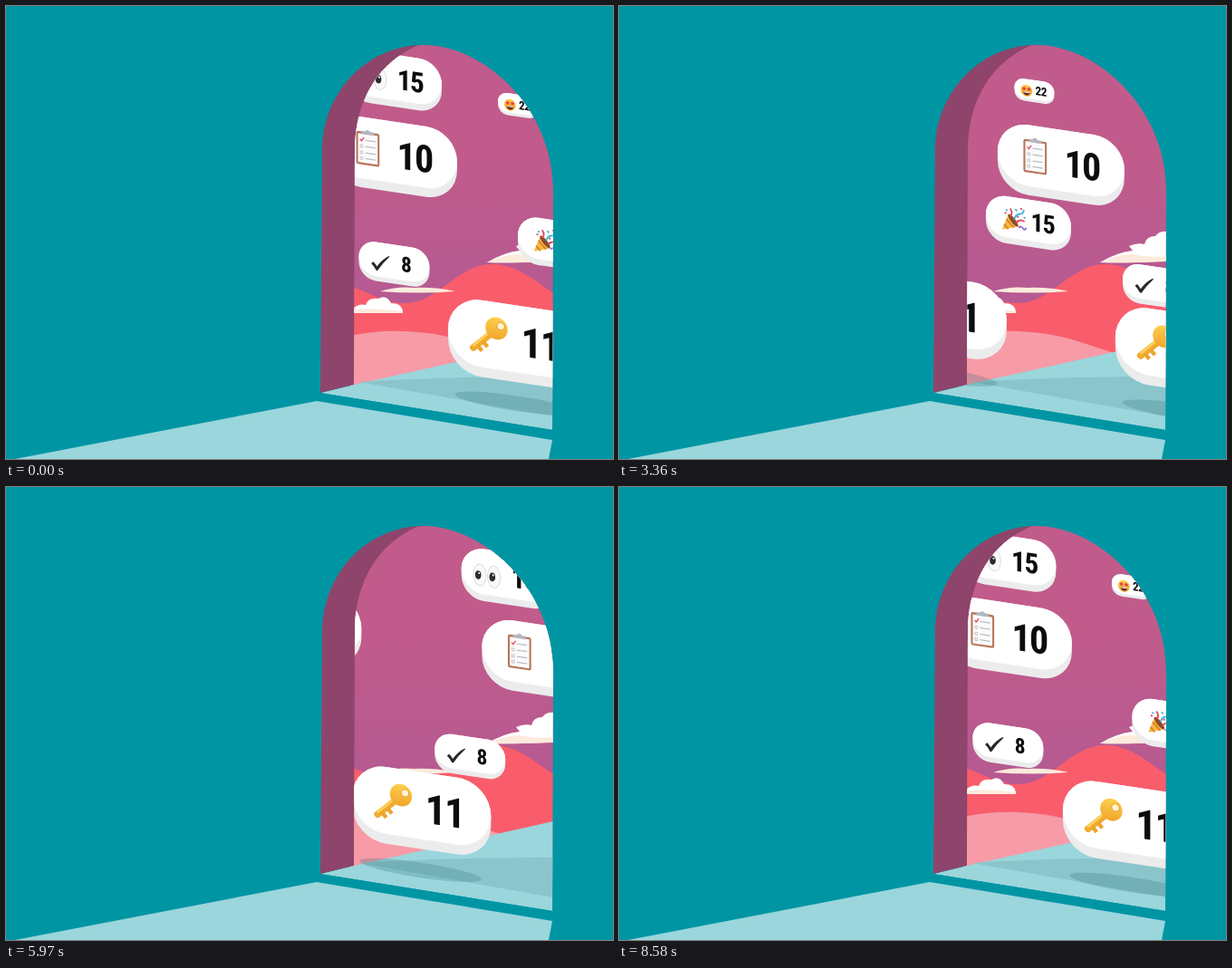
Animation, 670 px wide and 500 px high, one loop 8610 ms. Source, as an HTML page:

```html
<!DOCTYPE html>
<html lang="en">
<head>
<meta charset="utf-8">
<title>Doorway</title>
<style>
  html, body { margin: 0; width: 100%; height: 100%; overflow: hidden; background: #0095a3; }
  svg { display: block; width: 670px; height: 500px; }
  text {
    font: 700 30px "Roboto Condensed", "Open Sans Condensed", "Noto Sans Condensed", "Liberation Sans Narrow", Roboto, sans-serif;
    font-stretch: condensed;
    letter-spacing: -1.3px;
    text-anchor: middle;
    fill: #0c0c0e;
  }
</style>
</head>
<body>
<svg viewBox="0 0 670 500">
  <defs>
    <clipPath id="opening">
      <path d="M347 427L384 418L385 160C385 100 415 60 455 43.5L461 43C525 43 604 110 604 205L603 468Z"/>
    </clipPath>
    <linearGradient id="sky" x1="0" y1="0" x2="0" y2="1">
      <stop offset=".4" stop-color="#c15b8b"/>
      <stop offset="1" stop-color="#b45a93"/>
    </linearGradient>
    <linearGradient id="gold" x1="0" y1="0" x2="0" y2="1">
      <stop offset="0" stop-color="#ffcf4d"/>
      <stop offset="1" stop-color="#f0a52c"/>
    </linearGradient>

    <!-- Pill and icons, in units of 1/100 pill width -->
    <g id="pill">
      <rect x="-50" y="-27.7" width="100" height="55.4" rx="24.2" fill="#ececed"/>
      <rect x="-50" y="-27.7" width="100" height="48.4" rx="24.2" fill="#fff"/>
    </g>
    <g id="key" transform="translate(-21 -3.4)">
      <path d="M4 -3L-11 11" stroke="#f0ab31" stroke-width="4.6" stroke-linecap="round"/>
      <path d="M-7.500 9l3 3.200M-3.500 5.500l3 3.200" stroke="#eda32b" stroke-width="3"/>
      <path d="M3 -4L-11 9.500" stroke="#ffd259" stroke-width="1.500"/>
      <circle cx="6" cy="-5.500" r="8" fill="url(#gold)"/>
      <circle cx="9" cy="-7.500" r="2.700" fill="#fff3d2" stroke="#e39b28" stroke-width=".6"/>
    </g>
    <g id="board" transform="translate(-20.400 -4.300)">
      <rect x="-9.200" y="-12" width="18.400" height="26" rx="1.500" fill="#b8755a"/>
      <rect x="-7.700" y="-10.300" width="15.400" height="22.800" fill="#fcfbfc"/>
      <path d="M-5 -10v-2.500h3.200a1.900 1.900 0 0 1 3.600 0H5v2.500z" fill="#b3b7bf"/>
      <path d="M-2 -5.500h8M-2 -.5h8M-2 4.500h8M-2 9h8" stroke="#b9bcc4" stroke-width=".9"/>
      <path d="M-6 -1.500h2v2h-2zM-6 3.500h2v2h-2zM-6 8h2v2h-2z" fill="none" stroke="#b9bcc4" stroke-width=".6"/>
      <path d="M-6.200 -6l1.200 1.400 2 -3" fill="none" stroke="#e2525f" stroke-width="1"/>
    </g>
    <g id="eyes" transform="translate(-23 .5)">
      <g id="eye">
        <ellipse cx="-7.500" rx="6.800" ry="11.500" fill="#fafafa" stroke="#dcdce0" stroke-width=".9"/>
        <ellipse cx="-9.200" cy=".3" rx="3.200" ry="4.600" fill="#2b2c30"/>
        <circle cx="-8.300" cy="-1.800" r="1" fill="#fff"/>
      </g>
      <use href="#eye" x="15"/>
    </g>
    <g id="party" transform="translate(-17.500 -2)">
      <path d="M-13.500 14L-6 -5Q3 1 5 8Z" fill="#f7b83f"/>
      <path d="M-11 7.500l5 5.200M-8.500 1l9 9" stroke="#d9822b" stroke-width="2"/>
      <ellipse cx="-.5" cy="1.500" rx="2.800" ry="8.500" transform="rotate(-42 -.5 1.500)" fill="#8a4b2a"/>
      <path d="M-4 -3q4 -4 0 -9M3 4q4 -6 10 -3" fill="none" stroke="#e6475b" stroke-width="2"/>
      <path d="M1 0q1 -6 6 -7t5 -6" fill="none" stroke="#41b9d8" stroke-width="2"/>
      <path d="M6 9q3 -3 5 0t4 -1" fill="none" stroke="#9a62d6" stroke-width="2"/>
      <path d="M2 -12l2 2M-9 -10l2 1M12 -4l2 1" stroke="#41b9d8" stroke-width="2"/>
      <path d="M8 -13l2 -1M4 -4l2 1M-10 -5l1 -2" stroke="#e6475b" stroke-width="2"/>
    </g>
    <path id="check" transform="translate(-19.500 1)" fill="#26282c"
      d="M-13 2.500l3 -2.700q3 2.500 5 6Q2 -5 12 -11.500L13 -10.500Q3 0 -4 11.500h-2Q-9 6 -13 2.500Z"/>
    <g id="face" transform="translate(-19.500 1)">
      <circle r="14.500" fill="url(#gold)"/>
      <path id="star" fill="#e23d4c" d="M-6 -10l1.800 3.600 4 .5-3 2.800.8 4-3.600-2-3.600 2 .8-4-3-2.800 4-.5z"/>
      <use href="#star" x="12"/>
      <path d="M-8.500 3.500h17Q7 12 0 12T-8.500 3.500Z" fill="#6b2d23"/>
      <path d="M-7.500 3.500h15v2h-15z" fill="#fff"/>
    </g>
  </defs>

  <rect width="670" height="500" fill="#0095a3"/>
  <path d="M10 500L343 436L603 479L599 500Z" fill="#9ad6dc"/>
  <path d="M347 427L349 160C349 95 399 43 461 43L480 60L400 300L384 418Z" fill="#8f446b"/>

  <g clip-path="url(#opening)">
    <rect x="340" y="40" width="270" height="300" fill="url(#sky)"/>
    <path d="M380 309C402 317 418 328 440 328C478 328 497 285 537 285C565 285 585 305 606 318V430H380Z" fill="#f95d6b"/>
    <path d="M380 364C420 355 465 358 500 368L546 383L500 425H380Z" fill="#f79ba7"/>

    <path d="M531 283Q549 272 567 270L563 265Q572 261 580 263Q582 254 592 254Q596 248 606 249V281Q565 284 531 283Z" fill="#fff"/>
    <path d="M531 283Q550 274 566 274Q585 278 606 276V282Q565 284 531 283Z" fill="#fcebdc"/>
    <path d="M413 315Q432 309 450 311Q474 310 496 315Q455 318 413 315Z" fill="#fcebdc"/>
    <path d="M384 338V333Q390 328 397 330Q400 321 411 323Q420 318 425 328Q437 328 438 337Z" fill="#fff"/>
    <path d="M384 339V335Q410 333 438 337V339Z" fill="#fcebdc"/>

    <path d="M347 427L384 418L604 369V468Z" fill="#9ad6dc"/>
    <path d="M390 415Q490 409 604 409V453Z" fill="#8bc4cb"/>
    <g id="pills"></g>
  </g>
</svg>
<script>
  const LOOP = 8610, SLOPE = 0.149, HIDDEN_X = 300;

  // x and y are the pill centre at time 0; gap separates copies; laps is gaps travelled per loop.
  const pills = [
    { icon: "face",  label: "22", x: 565,   y: 110,   w: 44,  gap: 273, laps: 1 },
    { icon: "eyes",  label: "15", x: 429,   y: 82.5,  w: 104, gap: 410, laps: 1 },
    { icon: "party", label: "15", x: 612,   y: 263.5, w: 94,  gap: 410, laps: 1 },
    { icon: "check", label: "8",  x: 428.5, y: 285,   w: 78,  gap: 273, laps: 1 },
    { icon: "board", label: "10", x: 428,   y: 166.5, w: 140, gap: 273, laps: 2 },
    { icon: "key",   label: "11", x: 564.5, y: 373,   w: 153, gap: 273, laps: 2 },
  ];

  const shadow = '<ellipse cx="-1" cy="43" rx="44" ry="5.5" fill="#1d6570" opacity=".22"/>';
  const markup = p => `<g>${p.icon === "key" ? shadow : ""}<use href="#pill"/>
    <use href="#${p.icon}"/><text x="16.500" y="8.500">${p.label}</text></g>`;

  const layer = document.getElementById("pills");
  layer.innerHTML = pills.map(p => markup(p) + markup(p)).join("");
  const nodes = [...layer.children];

  function place(node, p, x) {
    const y = p.y + (x - p.x) * SLOPE, s = p.w / 100;
    node.setAttribute("transform", `matrix(${s} ${s * SLOPE} 0 ${s} ${x} ${y})`);
  }

  function draw(now) {
    const phase = now % LOOP / LOOP;
    pills.forEach((p, i) => {
      const raw = p.x - p.gap * p.laps * phase - HIDDEN_X;
      const x = HIDDEN_X + ((raw % p.gap) + p.gap) % p.gap;
      place(nodes[2 * i], p, x);
      place(nodes[2 * i + 1], p, x + p.gap);
    });
  }

  const start = performance.now();
  function tick() {
    draw(performance.now() - start);
    requestAnimationFrame(tick);
  }
  tick();
</script>
</body>
</html>
```
